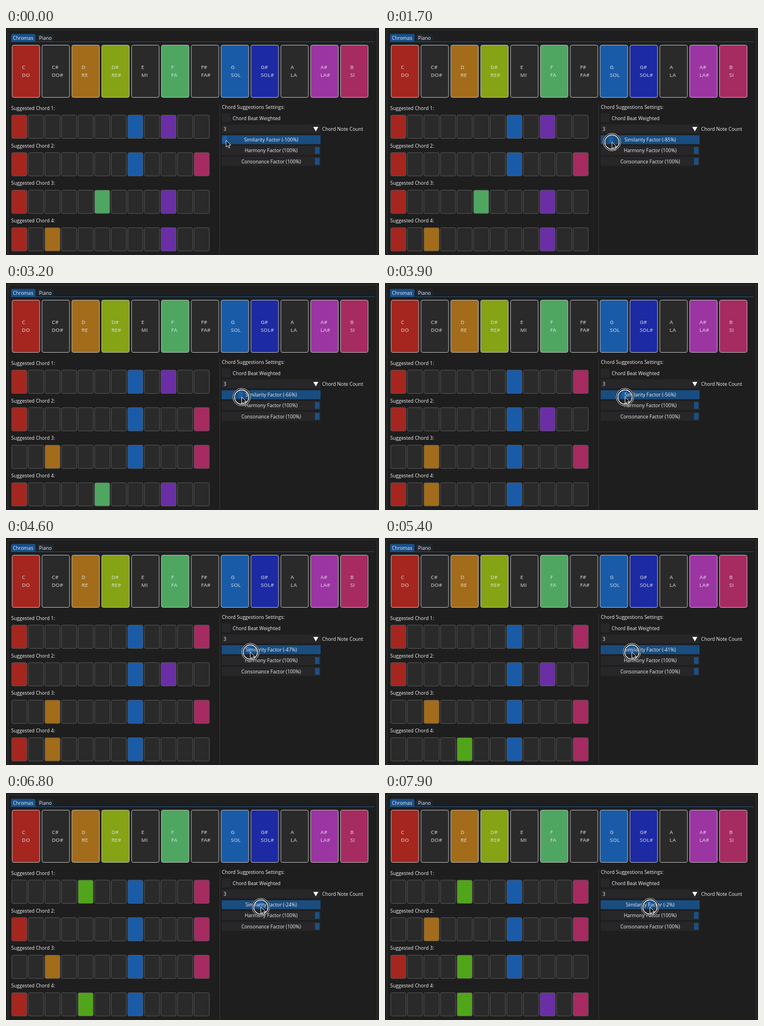
These frames come from a looping animation (664x404 px, 8000 ms). An HTML page:

```html
<!DOCTYPE html>
<html lang="en">
<head>
<meta charset="utf-8">
<title>Chord suggestions</title>
<style>
  html, body { margin: 0; width: 100%; height: 100%; overflow: hidden; background: #1e1e1e; }
  svg { display: block; }
  text { font: 500 8.65px "Open Sans", "Noto Sans", sans-serif; fill: #f2f2f2; white-space: pre; }
  .note { font-size: 9.4px; font-weight: 600; fill: #e6e6e6; opacity: .72; }
</style>
</head>
<body>
<svg id="stage" width="664" height="404" viewBox="0 0 664 404"></svg>
<script>
const DARK = '#2a2a2a', FIELD = '#272729', BLUE = '#194d80';
const stage = document.getElementById('stage');

function add(tag, attrs, parent = stage) {
  const node = document.createElementNS('http://www.w3.org/2000/svg', tag);
  for (const key in attrs) node.setAttribute(key, attrs[key]);
  return parent.appendChild(node);
}
const rect = (x, y, width, height, fill, more) => add('rect', { x, y, width, height, fill, ...more });
const line = (d, stroke) => add('path', { d, stroke, fill: 'none' });
function label(x, y, content, more) {
  const node = add('text', { x, y, ...more });
  node.textContent = content;
  return node;
}

// Window, tabs and separators
rect(3.5, 3.5, 657, 410, 'none', { stroke: '#343437' });
line('M8 24.5H656', '#1d4d7c');
add('path', { d: 'M9 24V13q0-2.5 2.5-2.5h38.5q2.5 0 2.5 2.5V24z', fill: '#18508a' });
add('path', { d: 'M55 24V13q0-2.5 2.5-2.5h25q2.5 0 2.5 2.5V24z', fill: '#20262d' });
label(12.3, 20.8, 'Chromas');
label(58.8, 20.8, 'Piano');
line('M380.5 135V404', '#353538');

// Chroma keys
const names = 'C C# D D# E F F# G G# A A# B'.split(' ');
const syllables = 'DO DO# RE RE# MI FA FA# SOL SOL# LA LA# SI'.split(' ');
const keyColors = { C: '#a4261f', D: '#a26c1b', 'D#': '#85a315', F: '#4fa661', G: '#1a5ba8',
  'G#': '#1c2aa4', 'A#': '#9b35a2', B: '#a62b60' };
names.forEach((name, i) => {
  const x = 11 + 53.14 * i;
  rect(x, 30.5, 49, 93, keyColors[name] || DARK, { rx: 3, stroke: '#c4c4c4', 'stroke-width': .9 });
  label(x + 17.3, 73.4, name, { class: 'note' });
  label(x + 17.3, 86.6, syllables[i], { class: 'note' });
});

// Suggested chords
const chordColors = { ...keyColors, E: '#51a51b', A: '#6a2fa5' };
const chordCells = [0, 1, 2, 3].map(row => {
  const y = 155 + 66.8 * row;
  label(9.3, y - 9.2, `Suggested Chord ${row + 1}:`);
  return names.map((_, i) =>
    rect(10.2 + 29.52 * i, y, 27, 41.5, DARK, { rx: 2.5, stroke: '#5b5b5b', 'stroke-width': .9 }));
});

// Settings
label(384.3, 144.3, 'Chord Suggestions Settings:');
rect(384, 152, 16, 16, FIELD);
label(403.5, 163.5, 'Chord Beat Weighted');
rect(384, 171.5, 176, 16, FIELD);
label(387.3, 182.8, '3');
add('path', { d: 'M547 176h9l-4.5 8z', fill: '#fff' });
label(562.8, 182.8, 'Chord Note Count');

const grabX = percent => 468 + .82 * percent;
function slider(y, fill, grabFill, content) {
  rect(384, y, 176, 16, fill);
  const grab = rect(grabX(100), y + 2, 8, 12, grabFill);
  return { grab, text: label(472, y + 11.2, content, { 'text-anchor': 'middle' }) };
}
const similarity = slider(190.8, BLUE, '#1f5da4', '');
slider(210, FIELD, '#1c5082', 'Harmony Factor (100%)');
slider(229.3, FIELD, '#1c5082', 'Consonance Factor (100%)');

// Pointer with press ring
const pointer = add('g', {});
const ring = add('g', { fill: 'none' }, pointer);
add('circle', { r: 14.4, stroke: '#080808', 'stroke-width': 4 }, ring);
add('circle', { r: 15.6, stroke: '#e8e8e8', 'stroke-width': 1 }, ring);
add('circle', { r: 12.8, stroke: '#f4f4f4', 'stroke-width': 1.4 }, ring);
add('path', { d: 'M0 0V11.6L2.7 9.2L4.6 13.4L6.6 12.5L4.8 8.4H8.4z', fill: '#0b0b0b',
  stroke: '#fff', 'stroke-width': .9, 'stroke-linejoin': 'round' }, pointer);

// [time, similarity percent]
const drag = [[0, -100], [400, -100], [1700, -85], [3200, -66], [4600, -47], [5000, -43],
  [5300, -43], [5900, -34], [6800, -24], [7900, -2], [8000, -2]];
// [start time, the four suggestions]
const suggestions = [
  [0, 'CGA CGB CFA CDA'],
  [2600, 'CGA CGB DGB CFA'],
  [3300, 'CGA CGB DGB CDG'],
  [3800, 'CGB CGA DGB CDG'],
  [4800, 'CGB CGA DGB EGB'],
  [5600, 'CGB EGB DGB CGA'],
  [6400, 'EGB CGB DGB CEG'],
  [7300, 'EGB DGB CGB CEG'],
  [7600, 'EGB DGB CEG EAB']
];

function percentAt(t) {
  const i = drag.findIndex(([time]) => time > t);
  const [t0, p0] = drag[i - 1], [t1, p1] = drag[i];
  return p0 + (p1 - p0) * (t - t0) / (t1 - t0);
}

let shown;
function draw(now) {
  const t = Math.floor(now % 8000 / 100) * 100;
  const percent = percentAt(t);
  similarity.grab.setAttribute('x', grabX(percent));
  similarity.text.textContent = `Similarity Factor (${Math.round(percent)}%)`;
  const y = 200 + 3 * Math.min(1, Math.max(0, (t - 400) / 800));
  pointer.setAttribute('transform', `translate(${473.3 + .815 * percent} ${y})`);
  ring.setAttribute('visibility', t < 100 ? 'hidden' : 'visible');

  const chords = suggestions.filter(([start]) => start <= t).pop()[1];
  if (chords !== shown) {
    shown = chords;
    chords.split(' ').forEach((chord, row) => chordCells[row].forEach((cell, i) =>
      cell.setAttribute('fill', chord.includes(names[i]) ? chordColors[names[i]] : DARK)));
  }
}

let began;
function tick(now) {
  began ??= now;
  draw(now - began);
  requestAnimationFrame(tick);
}
draw(0);
requestAnimationFrame(tick);
</script>
</body>
</html>
```
